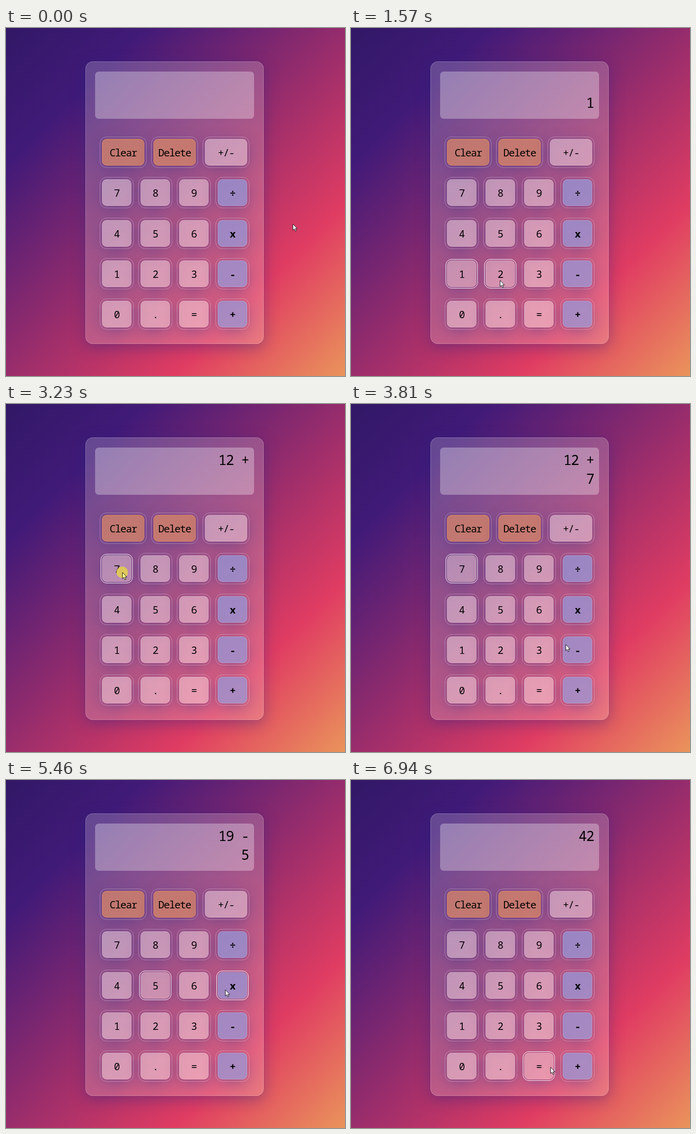
Recreate the animation shown at these times as an HTML page. Size 738 px wide and 759 px high, loop 8 s.

```html
<!DOCTYPE html>
<html lang="en">
<head>
<meta charset="utf-8">
<title>Calculator</title>
<style>
* { box-sizing: border-box; }
html, body { margin: 0; width: 100%; height: 100%; overflow: hidden; }
body {
  position: relative;
  background: linear-gradient(135deg, #311866, #411a78 20%, #e03c62 75%, #ea945b);
  font: 22px "Noto Sans Mono", "DejaVu Sans Mono", monospace;
  letter-spacing: -1.4px;
  color: #000;
}
.panel, .screen, .key, .line, svg { position: absolute; }
.panel {
  left: 173px; top: 73px; width: 388px; height: 616px;
  border: 1px solid rgba(255, 255, 255, .25); border-radius: 16px;
  background: rgba(255, 255, 255, .2);
  box-shadow: 0 8px 32px rgba(31, 38, 135, .37);
}
.screen {
  left: 194px; top: 95px; width: 346px; height: 103px;
  border-radius: 8px; background: rgba(255, 255, 255, .3);
}
.line {
  left: 194px; width: 334.6px; height: 41px;
  font-size: 30px; line-height: 41px; text-align: right; white-space: pre;
}
.key {
  display: flex; align-items: center; justify-content: center;
  border: 1px solid rgba(255, 255, 255, .18); border-radius: 10px;
  background: rgba(255, 255, 255, .39); background-clip: border-box;
  box-shadow: 0 8px 32px rgba(31, 38, 135, .37);
  outline: 1px solid rgba(255, 255, 255, .32); outline-offset: 4px;
}
.edit { background: rgba(208, 130, 105, .8); border-color: rgba(240, 150, 90, .6); }
.op { background: rgba(142, 156, 224, .68); font-weight: bold; }
.active { outline: 1px solid #fff; outline-offset: 2px; }
.active:not(.op) { background: rgba(255, 255, 255, .34); }
svg { left: 0; top: 0; width: 738px; height: 759px; }
</style>
</head>
<body>
<div class="panel"></div>
<div class="screen"></div>
<div class="line" id="upper" style="top:100.5px"></div>
<div class="line" id="lower" style="top:142px"></div>
<svg id="overlay">
  <g id="pointer">
    <circle id="press" r="12.5" fill="#e2cb55" fill-opacity=".92"/>
    <path id="arrow" d="M.5 .5V14L3.6 11.2L5.7 16.2L8 15.2L5.9 10.4H10Z" stroke="#111" stroke-width="1"/>
  </g>
</svg>
<script>
const LOOP = 8000, START = 720, STEP = 82.857;
const $ = id => document.getElementById(id);
const keys = {};

function addKey(label, x, y, w, kind) {
  const el = document.createElement("div");
  el.className = "key " + kind;
  el.textContent = label;
  Object.assign(el.style, { left: x + "px", top: y + "px", width: w + "px", height: "58px" });
  document.body.insertBefore(el, $("overlay"));
  keys[label] = { el, x, y, w };
}

["Clear", "Delete", "+/-"].forEach((label, i) =>
  addKey(label, 209 + i * 112, 242, 92, i < 2 ? "edit" : ""));
["789÷", "456x", "123-", "0.=+"].forEach((row, r) =>
  [...row].forEach((label, c) =>
    addKey(label, 209 + c * 84, Math.round(330.4 + r * 88.2), 64, c === 3 ? "op" : "")));

// Pointer moves: first step, last step, target x, y
const moves = [
  [-1, 6, 266, 548], [8, 10, 324, 550], [12, 18, 478, 612],
  [19, 26, 253, 367], [31, 38, 480, 533], [41, 45.5, 325, 453],
  [50, 57.5, 479, 457], [59, 63, 415, 540], [65, 70, 441, 613], [70, 72, 434, 626]
];

// Key presses, each one step long: step, key, upper and lower line after release
const presses = [
  [7, "1", "", "1"], [11, "2", "", "12"], [19, "+", "12 +", ""],
  [30, "7", "12 +", "7"], [40, "-", "19 -", ""], [49, "5", "19 -", "5"],
  [58, "x", "14 x", ""], [64, "3", "14 x", "3"], [74, "=", "42", ""]
];

function pointerAt(step) {
  let x = 624, y = 427;
  for (const [from, to, tx, ty] of moves) {
    const u = Math.min(1, Math.max(0, (step - from) / (to - from)));
    const e = u * u * (3 - 2 * u);
    x += (tx - x) * e;
    y += (ty - y) * e;
  }
  return [Math.round(x), Math.round(y)];
}

function draw(now) {
  const step = Math.max(-1, Math.floor((now % LOOP - START) / STEP));
  const [x, y] = pointerAt(step);
  const [hx, hy] = pointerAt(step - 1); // hover follows one step behind
  const begun = presses.filter(p => p[0] <= step);
  const done = begun.filter(p => p[0] < step);
  const focus = begun.length ? begun[begun.length - 1][1] : "";
  const [, , upper, lower] = done.length ? done[done.length - 1] : [0, "", "", ""];
  const down = begun.length > done.length;

  for (const label in keys) {
    const k = keys[label];
    const hover = hx >= k.x && hx <= k.x + k.w && hy >= k.y && hy <= k.y + 58;
    k.el.classList.toggle("active", hover || label === focus);
  }
  $("upper").textContent = upper;
  $("lower").textContent = lower;
  $("pointer").setAttribute("transform", `translate(${x} ${y})`);
  $("press").setAttribute("visibility", down ? "visible" : "hidden");
  $("arrow").setAttribute("fill", down ? "#ffff8c" : "#f6f0f6");
  requestAnimationFrame(draw);
}

const origin = performance.now();
const tick = draw;
draw = now => tick(Math.max(0, now - origin));
draw(origin);
</script>
</body>
</html>
```
